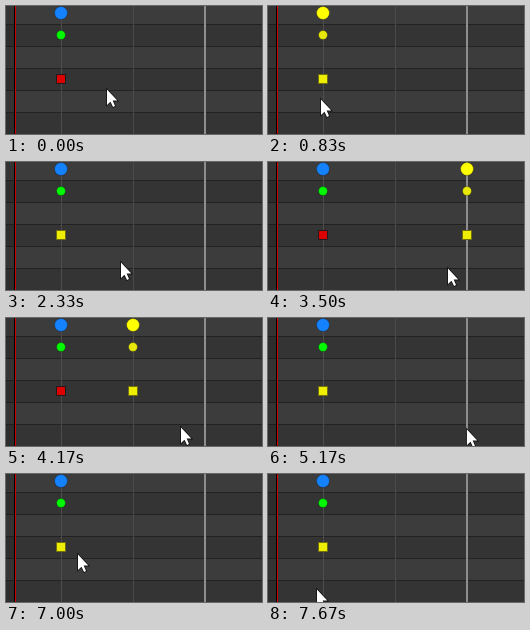
Animation, 256 px wide and 128 px high, one loop 8000 ms. Source, as an HTML page with a canvas:

```html
<!DOCTYPE html>
<html lang="en">
<head>
<meta charset="utf-8">
<title>Keyframe timeline</title>
<style>
  html, body { margin: 0; width: 100%; height: 100%; overflow: hidden; background: #353535; }
  canvas { display: block; width: 256px; height: 128px; }
</style>
</head>
<body>
<canvas id="stage" width="256" height="128"></canvas>
<script>
const ctx = document.getElementById('stage').getContext('2d');
const LOOP = 8000, STEPS_PER_SECOND = 6, ROW = 22, COLUMN = 72;
const firstColumn = 55, middleColumn = firstColumn + COLUMN, playhead = middleColumn + COLUMN;
const arrow = new Path2D('M1 1.5V17L4.5 13.7L7 19L9 18L6.7 12.6H11.3Z');

function pointerAt(step) {
  let x = 100, y = 82;
  function glide(start, end, toX, toY, power = 1) {
    const k = Math.min(1, Math.max(0, (step - start) / (end - start))) ** power;
    x += (toX - x) * k;
    y += (toY - y) * k;
  }
  glide(0, 7, 33, 96);
  glide(7, 9, 68, 96);
  glide(11, 18, 200, 104, 1.24);
  // Drag the keys left and back.
  glide(20, 22.4, 150, 106);
  glide(23, 27, 198, 110);
  glide(32, 35, 111, 88);
  glide(35, 37, 68, 62);
  glide(37, 38, 82, 54);
  // Leave through the bottom edge, then peek in.
  glide(41, 44, 48, 130);
  glide(45, 46, 48, 114);
  return [Math.round(x), Math.round(y)];
}

function rect(color, x, y, w, h) {
  ctx.fillStyle = color;
  ctx.fillRect(x, y, w, h);
}

function dot(color, x, y, radius) {
  ctx.beginPath();
  ctx.arc(x, y, radius, 0, Math.PI * 2);
  ctx.fillStyle = color;
  ctx.fill();
  ctx.strokeStyle = 'rgba(20,20,20,.35)';
  ctx.lineWidth = 1;
  ctx.stroke();
}

function drawKeys(x, groupSelected, keySelected) {
  dot(groupSelected ? '#ffff00' : '#1482ff', x, 7, 6.5);
  dot(groupSelected ? '#e8e808' : '#00fa00', x, 7 + ROW, 4.5);
  rect(keySelected ? '#6f6f12' : '#1c1c1c', x - 5, 68, 10, 10);
  rect(keySelected ? '#eeee00' : '#dc0000', x - 4, 69, 8, 8);
}

function drawGrid() {
  for (let row = 0; row < 6; row++) {
    const y = row * ROW - 4;
    rect(row % 2 ? '#343434' : '#3c3c3c', 0, y, 256, ROW);
    if (row) rect('#222', 0, y, 256, 1);
  }
  rect('rgba(0,0,0,.13)', 0, 0, 8, 128);
  rect('#4d4d4d', firstColumn, 0, 1, 128);
  rect('#4a4a4a', middleColumn, 0, 1, 128);
  rect('#8e8e8e', playhead - 1, 0, 2, 128);
  rect('#000', 8, 0, 1, 128);
  rect('#d00000', 9, 0, 1, 128);
}

function drawPointer(x, y) {
  ctx.save();
  ctx.translate(x, y);
  ctx.strokeStyle = '#111';
  ctx.lineWidth = 1.6;
  ctx.stroke(arrow);
  ctx.fillStyle = '#fff';
  ctx.fill(arrow);
  ctx.restore();
}

function draw(time) {
  const step = Math.floor((time % LOOP + 4) * STEPS_PER_SECOND / 1000) % 48;
  const [x, y] = pointerAt(step);
  const allSelected = step >= 4 && step < 12;
  const pasted = step >= 18 && step < 31;
  drawGrid();
  drawKeys(firstColumn, allSelected, step >= 4 && !pasted);
  if (pasted) {
    const dragged = step > 20 && x < 177;
    drawKeys(dragged ? middleColumn : playhead, true, true);
  }
  drawPointer(x, y);
}

const start = performance.now();
function tick() {
  draw(performance.now() - start);
  requestAnimationFrame(tick);
}
tick();
</script>
</body>
</html>
```
